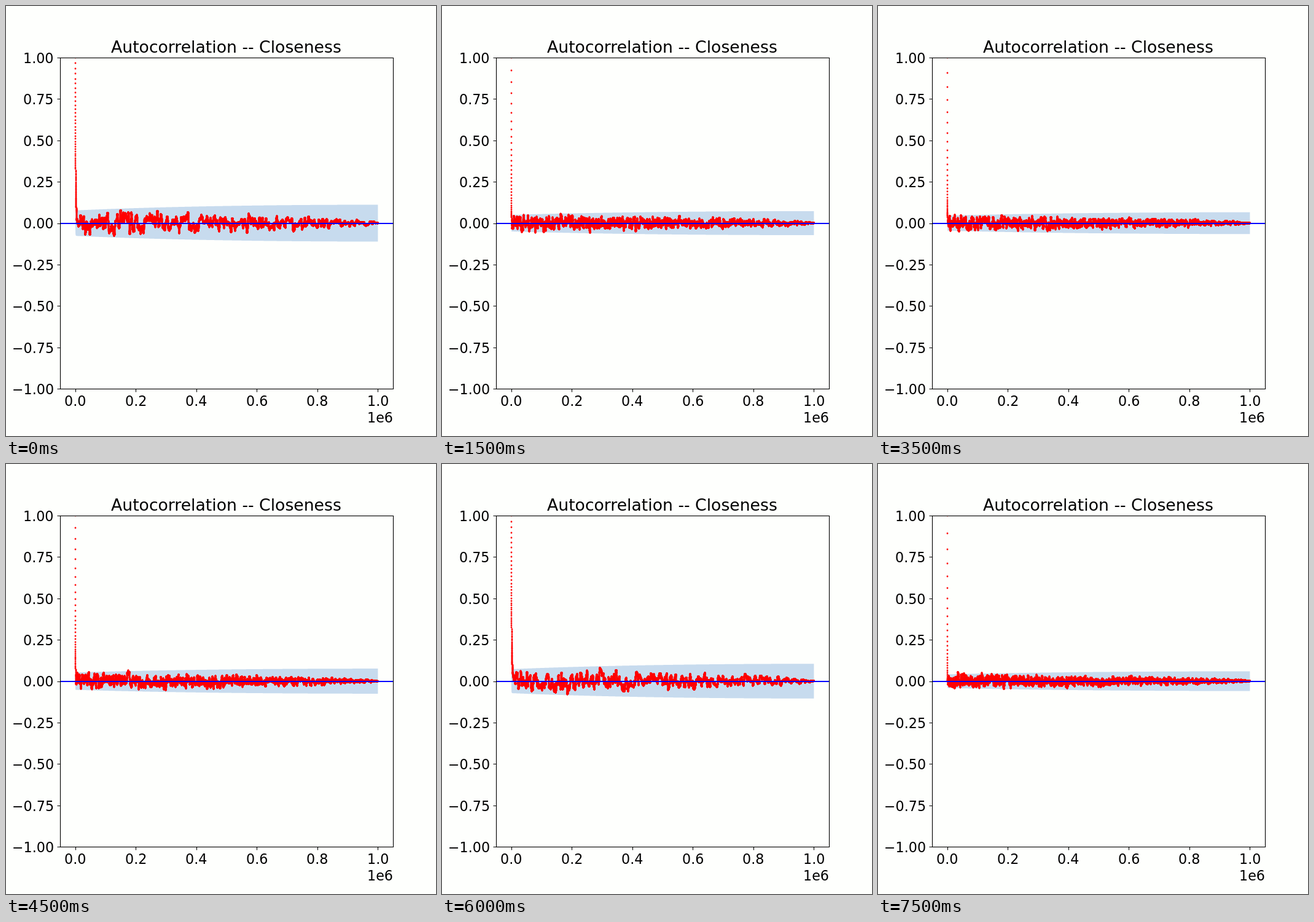
An HTML page with a canvas that plays this animation: 700 px wide and 700 px high, repeating every 8000 ms.

```html
<!DOCTYPE html>
<html lang="en">
<head>
<meta charset="utf-8">
<title>Autocorrelation</title>
<style>
  html, body { margin: 0; width: 100%; height: 100%; overflow: hidden; background: #fefffd; }
  canvas { display: block; width: 700px; height: 700px; }
</style>
</head>
<body>
<canvas id="plot" width="700" height="700"></canvas>
<script>
const ctx = document.getElementById('plot').getContext('2d');
const STEP = 500;
const N = 20000;
const BOX = { x: 88.5, y: 84.5, w: 542, h: 539 };

// Lag-one correlation of each run; everything else follows from it
const phis = [
  .968, .953, .934, .926,
  .960, .938, .916, .911,
  .964, .932, .908, .900,
  .964, .936, .916, .892
];

const px = t => 112.64 + 492.8 * t;
const py = v => 353.5 - 269.5 * v;

function random(seed) {
  return () => {
    seed = (seed + 0x6D2B79F5) | 0;
    let z = Math.imul(seed ^ (seed >>> 15), 1 | seed);
    z = (z + Math.imul(z ^ (z >>> 7), 61 | z)) ^ z;
    return ((z ^ (z >>> 14)) >>> 0) / 4294967296;
  };
}

// Sample autocorrelation of a first-order process: geometric decay plus smooth noise
function series(phi, seed) {
  const rnd = random(seed);
  const q = phi * phi;
  const norm = Math.sqrt((1 + q) / (1 - q) ** 3);
  const sd = Math.sqrt((1 + q) / (1 - q) / N);
  const rho = [];
  let u = 0, v = 0;
  for (let k = -400; k < N; k++) {
    u = phi * u + (rnd() + rnd() + rnd() + rnd() - 2) * Math.sqrt(3);
    v = phi * v + u;
    if (k < 0) continue;
    const decay = phi ** k;
    const fade = Math.sqrt(1 - k / N) * (1 - decay * decay);
    rho.push(decay + 3.2 * Math.tanh(v / norm / 3.2) * sd * fade);
  }
  return rho;
}

// Confidence band: quick rise over the decay, then slow widening
function drawBand(phi) {
  const q = phi * phi;
  const halfWidth = k => {
    const t = k / N;
    const sum = 1 + 2 * q * (1 - q ** (k - 1)) / (1 - q);
    return 1.96 * Math.sqrt(sum * (1 + 1.1 * t * (2 - t)) / N);
  };
  ctx.fillStyle = '#c7dbee';
  ctx.beginPath();
  for (let k = 1; k < N; k += 20) ctx.lineTo(px(k / N), py(halfWidth(k)));
  ctx.lineTo(px(1), py(halfWidth(N)));
  for (let k = N; k > 0; k -= 20) ctx.lineTo(px(k / N), py(-halfWidth(k)));
  ctx.fill();
}

const dot = document.createElement('canvas');
dot.width = dot.height = 4;
const dotCtx = dot.getContext('2d');
dotCtx.fillStyle = '#ff0000';
dotCtx.arc(2, 2, 1.4, 0, 7);
dotCtx.fill();

function drawDots(rho) {
  rho.forEach((v, k) => {
    ctx.drawImage(dot, Math.round(px(k / N)) - 2, Math.round(py(v)) - 2);
  });
}

// Whole-pixel text; align is the share of the width left of x
function text(str, x, y, align, size = 22.22) {
  ctx.font = size + 'px "DejaVu Sans", sans-serif';
  ctx.fillText(str, Math.round(x - ctx.measureText(str).width * align), Math.round(y));
}

function drawAxes() {
  ctx.strokeStyle = ctx.fillStyle = '#000';
  ctx.lineWidth = 1.11;
  ctx.strokeRect(BOX.x, BOX.y, BOX.w, BOX.h);
  ctx.beginPath();
  for (let i = 0; i <= 8; i++) {
    const v = 1 - i / 4;
    const y = Math.round(py(v)) + .5;
    ctx.moveTo(83.5, y);
    ctx.lineTo(BOX.x, y);
    text(v.toFixed(2).replace('-', '\u2212'), 77.7, py(v) + 8.95, 1);
  }
  for (let i = 0; i <= 5; i++) {
    const x = Math.round(px(i / 5)) + .5;
    ctx.moveTo(x, 623.5);
    ctx.lineTo(x, 628.5);
    text((i / 5).toFixed(1), px(i / 5), 651, .5);
  }
  ctx.stroke();
  text('1e6', 630, 678, 1);
  text('Autocorrelation -- Closeness', 358.5, 76, .5, 26.67);
}

function draw(index) {
  const phi = phis[index];
  ctx.fillStyle = '#fefffd';
  ctx.fillRect(0, 0, 700, 700);
  ctx.save();
  ctx.beginPath();
  ctx.rect(88, 84, BOX.w, BOX.h);
  ctx.clip();
  drawBand(phi);
  drawDots(series(phi, 71 + index * 137));
  ctx.fillStyle = '#0000ff';
  ctx.fillRect(88, 353, BOX.w, 2);
  ctx.restore();
  drawAxes();
}

let shown = -1;
function tick() {
  const index = Math.floor(performance.now() / STEP) % phis.length;
  if (index !== shown) draw(shown = index);
  requestAnimationFrame(tick);
}
tick();
</script>
</body>
</html>
```
